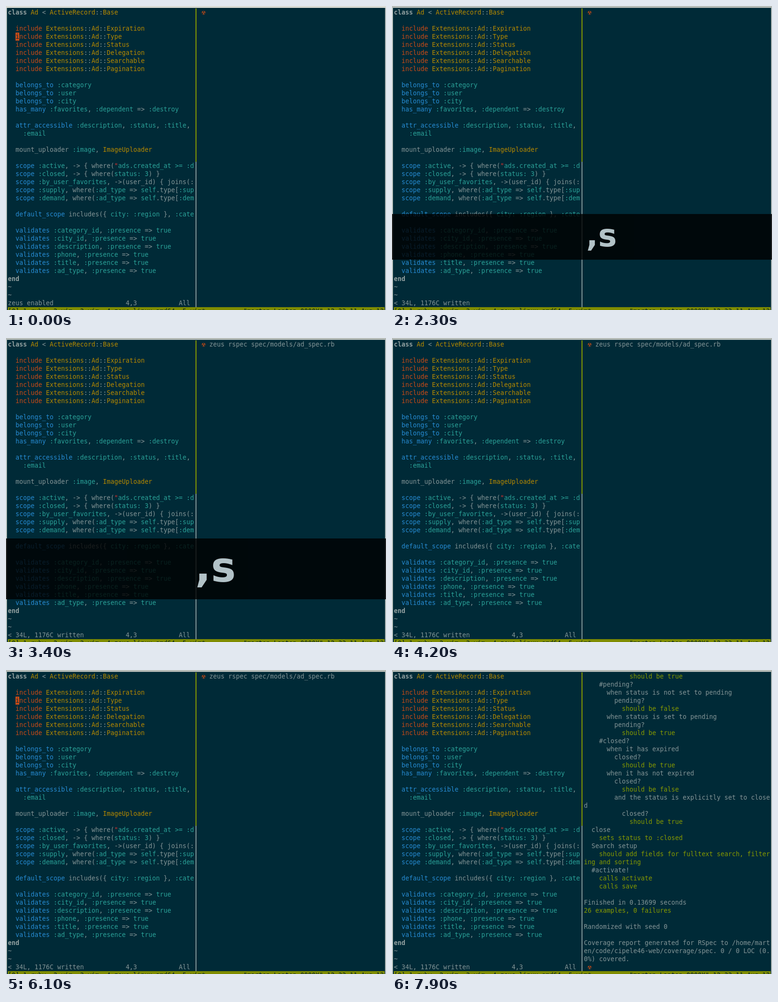
These frames come from a looping animation (800 by 640 pixels, 8 s). An HTML page:

```html
<!DOCTYPE html>
<html lang="en">
<head>
<meta charset="utf-8">
<title>Editor and test run</title>
<style>
html, body { margin: 0; width: 100%; height: 100%; overflow: hidden; }
#stage { position: relative; width: 800px; height: 640px; overflow: hidden; background: #002a37; }
#stage > * { position: absolute; }
pre { margin: 0; top: 5px; font: 13.29px/17px "DejaVu Sans Mono", monospace; color: #839496; font-variant-ligatures: none; }
pre b { color: #93a1a1; }
#code { left: 4px; }
#out { left: 404px; }
.o { color: #cb4b16; }
.y { color: #b58900; }
.c { color: #2aa198; }
.b { color: #268bd2; }
.g { color: #859900; }
.r { color: #dc322f; }
.sign { display: inline-block; width: 1ch; color: #cb4b16; }
#cursor { left: 20px; top: 56px; width: 8px; height: 17px; background: #cb4b16; color: #002a37; }
#top { left: 0; top: 0; width: 800px; height: 4px; }
#left { left: 0; top: 4px; width: 2px; height: 636px; background: #c8ceca; }
#right { left: 798px; top: 4px; width: 2px; height: 636px; background: #b4bcba; }
#split { left: 399px; top: 5px; width: 2px; height: 629px; background: linear-gradient(#859900 323px, #839496 323px); }
#bar { left: 4px; top: 634px; width: 793px; height: 17px; background: #7f8c00; color: #002029; }
#keys { left: -242px; top: 422px; width: 1366px; height: 128px; background: #000; color: #dfe8ec;
  font: bold 88px/128px "DejaVu Sans", sans-serif; text-align: center; }
#keys span { position: relative; top: -3px; }
</style>
</head>
<body>
<div id="stage">
  <pre id="code"></pre>
  <pre id="out"></pre>
  <pre id="cursor">i</pre>
  <div id="split"></div>
  <pre id="bar"></pre>
  <div id="top"></div>
  <div id="left"></div>
  <div id="right"></div>
  <div id="keys"><span>,s</span></div>
</div>
<script>
const $ = id => document.getElementById(id);
const LOOP = 8000;

const source = `class Ad < ActiveRecord::Base

  include Extensions::Ad::Expiration
  include Extensions::Ad::Type
  include Extensions::Ad::Status
  include Extensions::Ad::Delegation
  include Extensions::Ad::Searchable
  include Extensions::Ad::Pagination

  belongs_to :category
  belongs_to :user
  belongs_to :city
  has_many :favorites, :dependent => :destroy

  attr_accessible :description, :status, :title,
    :email

  mount_uploader :image, ImageUploader

  scope :active, -> { where("ads.created_at >= :d
  scope :closed, -> { where(status: 3) }
  scope :by_user_favorites, ->(user_id) { joins(:
  scope :supply, where(:ad_type => self.type[:sup
  scope :demand, where(:ad_type => self.type[:dem

  default_scope includes({ city: :region }, :cate

  validates :category_id, :presence => true
  validates :city_id, :presence => true
  validates :description, :presence => true
  validates :phone, :presence => true
  validates :title, :presence => true
  validates :ad_type, :presence => true
end
~
~
`;

const report = `            should be true
    #pending?
      when status is not set to pending
        pending?
          should be false
      when status is set to pending
        pending?
          should be true
    #closed?
      when it has expired
        closed?
          should be true
      when it has not expired
        closed?
          should be false
        and the status is explicitly set to close
d
          closed?
            should be true
  close
    sets status to :closed
  Search setup
    should add fields for fulltext search, filter
ing and sorting
  #activate!
    calls activate
    calls save

Finished in 0.13699 seconds
26 examples, 0 failures

Randomized with seed 0

Coverage report generated for RSpec to /home/mart
en/code/cipele46-web/coverage/spec. 0 / 0 LOC (0.
0%) covered.
`;

// Named groups double as colour classes
const syntax = new RegExp([
  '(?<k>^class|^end)',
  '(?<c>(?<=").+|(?<!:):\\w+|\\w+:(?= )|\\b(?:true|self|3)\\b)',
  '(?<o>\\binclude\\b)',
  '(?<b>\\b(?:belongs_to|has_many|attr_accessible|default_scope|scope|validates)\\b)',
  '(?<y>\\b[A-Z]\\w*)',
  '(?<r>")'
].join('|'), 'gm');

const paint = (kind, text) => kind === 'k' ? `<b>${text}</b>` : `<span class="${kind}">${text}</span>`;

const code = source.replace(syntax, (text, ...rest) => {
  const groups = rest.at(-1);
  return paint(Object.keys(groups).find(k => groups[k] !== undefined), text);
});

const prompt = ' <span class="sign">☢</span> ';
const command = prompt + 'zeus rspec spec/models/ad_spec.rb';
const results = report.replace(/^ *(should|sets|calls|26|ing) .*$/gm, line => paint('g', line)) + prompt;

const ruler = text => text.padEnd(31) + '4,3'.padEnd(14) + 'All';
const saved = '< 34L, 1176C written';

$('bar').textContent = '[0] 1:ruby  2:vim  3:vim  4:zeus-linux-amd64  5:vim*-'.padEnd(62)
  + '"marten-Laptop-0000X" 12:33 11-Aug-13';

const clamp = x => Math.max(0, Math.min(1, x));
const ramp = (t, from, to) => clamp((t - from) / (to - from));

function setHTML(el, html) {
  if (el.shown !== html) el.innerHTML = el.shown = html;
}

function draw(t) {
  const status = t < 2200 ? ruler('zeus enabled') : t < 2400 ? saved : ruler(saved);
  setHTML($('code'), code + status);
  setHTML($('out'), t < 2500 ? prompt : t < 7000 ? command : results);
  $('cursor').hidden = t % 1215 >= 540;
  $('cursor').style.display = $('cursor').hidden ? 'none' : 'block';
  $('top').style.background = t < 1000 ? '#d8dad4' : '#b4bab6';

  // The key overlay zooms in and out around its centre
  const zoom = ramp(t, 2100, 2500) * (1 - ramp(t, 3600, 4000));
  $('keys').style.opacity = 0.8 * clamp(zoom * 2);
  $('keys').style.transform = `scale(${0.5 + zoom / 2})`;
}

function tick(now) {
  draw(now % LOOP);
  requestAnimationFrame(tick);
}
draw(0);
requestAnimationFrame(tick);
</script>
</body>
</html>
```
